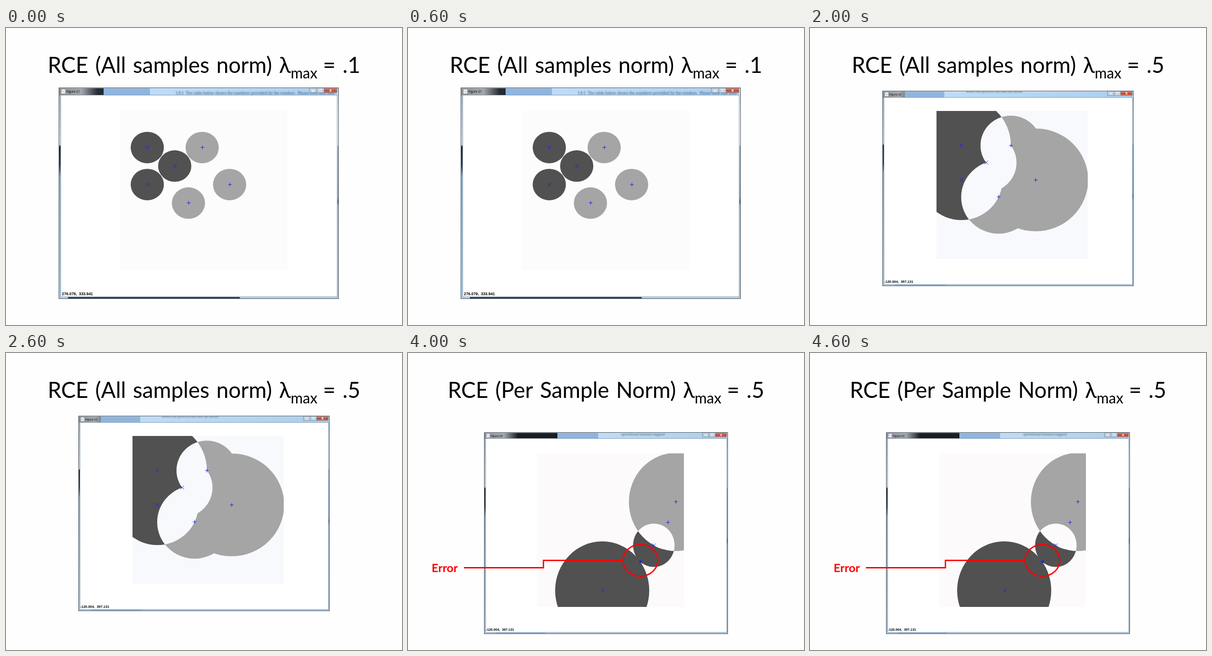
An HTML page with a canvas that plays this animation: 864 by 648 pixels, repeating every 5 s.

```html
<!DOCTYPE html>
<html lang="en">
<head>
<meta charset="utf-8">
<title>RCE classifier slides</title>
<style>
  html, body { margin: 0; width: 100%; height: 100%; overflow: hidden; background: #fefefe; }
  canvas { display: block; }
</style>
</head>
<body>
<canvas id="stage" width="864" height="648"></canvas>
<script>
const ctx = document.getElementById('stage').getContext('2d');

// Sample positions are fractions of the plot's width and height.
const grid = points => points.map(([x, y]) => [x * 0.0818 + 0.001, y * 0.1164]);
const shared = {
  dark: grid([[2, 2], [4, 3], [2, 4]]),
  light: grid([[6, 2], [8, 4], [5, 5]])
};

// win: x, y, w, h of the window; plot: the same for the axes;
// split: where the title bar turns from dark to mid blue to pale blue.
const slides = [
  { title: 'All samples norm', max: '.1', fig: 21, coords: '276.079,  333.941',
    win: [115, 130, 611, 461], plot: [248, 180, 366, 347], bg: '#fcfcfc',
    split: [213, 314], shade: '#252a30', samples: shared,
    ghost: ['1.8.1  The table below shows the numbers provided by the vendors.  Please note that they', 370, 144, '#3c5878'] },
  { title: 'All samples norm', max: '.15', fig: 24, coords: '-120.004,  397.131',
    win: [144, 151, 562, 429], plot: [264, 196, 340, 325], bg: '#fcfcfc',
    split: [310, 397], shade: '#1b1d20', samples: shared,
    ghost: ['(Before:  Assumptions and measured rates, i.e. failure rates)', 445, 163, '#a04860'] },
  { title: 'All samples norm', max: '.5', fig: 22, coords: '-120.004,  397.131',
    win: [158, 137, 548, 426], plot: [276, 181, 330, 323], bg: '#f7f9fd',
    split: [207, 293], shade: '#84888d', samples: shared,
    ghost: ['when the process has met all needs', 340, 140, '#40607c'] },
  { title: 'Normalized per class', max: '.5', fig: 28, coords: '-120.004,  397.131',
    win: [173, 151, 514, 412], plot: [284, 195, 309, 312], bg: '#fcfcfc',
    split: [320, 404], shade: '#202327',
    samples: {
      dark: [[0.408, 0.372], [0.8155, 0.558], [0.409, 0.745]],
      light: [[0.536, 0.2965], [0.7136, 0.596], [0.4466, 0.745]]
    } },
  { title: 'Per Sample Norm', max: '.5', fig: 29, coords: '-120.004,  397.131',
    win: [166, 173, 532, 440], plot: [281, 219, 321, 335], bg: '#fcfafb',
    split: [326, 415], shade: '#1b1d20', error: true,
    samples: {
      dark: [[0.7955, 0.5985], [0.7035, 0.7054], [0.4445, 0.893]],
      light: [[0.9453, 0.3164], [0.8925, 0.4478], [0.7035, 0.7054]]
    },
    ghost: ['operational mission support', 465, 179, '#40607c'] }
];

function rect(color, x, y, w, h) {
  ctx.fillStyle = color;
  ctx.fillRect(x, y, w, h);
}

function text(str, x, y, font, color = '#000') {
  ctx.font = font;
  ctx.fillStyle = color;
  ctx.fillText(str, x, y);
}

function gradient(x0, y0, x1, y1, stops) {
  const g = ctx.createLinearGradient(x0, y0, x1, y1);
  for (const [at, color] of stops) g.addColorStop(at, color);
  return g;
}

function line(points, color, width) {
  ctx.beginPath();
  for (const [x, y] of points) ctx.lineTo(x, y);
  ctx.strokeStyle = color;
  ctx.lineWidth = width;
  ctx.stroke();
}

function drawTitle({ title, max }) {
  const big = '47.5px Carlito, Lato, sans-serif', small = '32px Carlito, Lato, sans-serif';
  const parts = [[`RCE (${title}) λ`, big, 98], ['max', small, 110], [` = ${max}`, big, 98]];
  ctx.wordSpacing = '3px';
  const widths = parts.map(([str, font]) => {
    ctx.font = font;
    return ctx.measureText(str).width;
  });
  let x = 432 - widths.reduce((a, b) => a + b) / 2;
  parts.forEach(([str, font, y], i) => {
    text(str, x, y, font);
    x += widths[i];
  });
  ctx.wordSpacing = '0px';
}

function drawButtons(right, y, s) {
  const h = Math.round(10 * s), left = right - 60 * s;
  const mid = left + 16 * s, close = left + 32 * s;
  rect(gradient(0, y, 0, y + h, [[0, '#dde9f5'], [0.5, '#b4c8dc'], [1, '#c9dcee']]), left, y, 32 * s, h);
  rect(gradient(0, y, 0, y + h, [[0, '#e0a094'], [0.5, '#c54630'], [1, '#d4684c']]), close, y, 28 * s, h);
  ctx.strokeStyle = '#66788a';
  ctx.lineWidth = 0.8;
  ctx.strokeRect(left, y, 60 * s, h);
  line([[mid, y], [mid, y + h]], '#66788a', 0.8);
  line([[close, y], [close, y + h]], '#66788a', 0.8);
  rect('#fff', left + 5 * s, y + 5 * s, 6 * s, 2 * s);
  ctx.strokeStyle = '#fff';
  ctx.strokeRect(mid + 6 * s, y + 3 * s, 4 * s, 4 * s);
  text('x', close + 11.5 * s, y + 7.8 * s, `bold ${9 * s}px "Open Sans", sans-serif`, '#fff');
}

function drawWindow({ win: [x, y, w, h], split: [a, b], shade, fig, coords, ghost }) {
  const s = w / 611, side = Math.round(4.55 * s), bar = Math.round(16.5 * s);
  const right = x + w - Math.round(3.5 * s), bottom = y + h - Math.round(4.55 * s);

  rect('#b8d6f1', x, y, w, h);
  rect(gradient(0, y, 0, y + h, [[0, '#a9b4bd'], [0.1, '#b9c4cc'], [0.27, '#d8dde0'], [0.28, '#24282d'],
    [0.37, '#39434c'], [0.42, '#8fb0cf'], [1, '#b0cfec']]), x, y, side, h);
  rect(gradient(0, y, 0, y + h, [[0, '#bcd8f0'], [0.1, '#eef4f9'], [0.27, '#f4f7fa'], [0.28, '#9dc0e0'],
    [0.52, '#8fb2d4'], [0.54, '#58718b'], [0.56, '#a5c7e6'], [1, '#b0cfec']]), right, y, x + w - right, h);
  rect('#9bbfe2', x + w * 0.05, bottom, w * 0.2, y + h - bottom);
  if (fig === 21) rect('#3a434d', x + 20, bottom + 1, 375, 3);

  // Glass title bar over a darker backdrop on the left.
  const dark = a - x;
  rect(gradient(x, 0, a, 0, [[0, '#8c9094'], [Math.min(0.75, 50 * s / dark), '#a3a6aa'],
    [Math.min(0.97, 85 * s / dark), shade], [1, shade]]), x, y, dark, bar);
  rect('#8fb5de', a, y, b - a, bar);
  rect(gradient(b, 0, right, 0, [[0, '#bfdcf6'], [1, '#abceee']]), b, y, right - b, bar);
  if (ghost) {
    const [str, gx, gy, color] = ghost;
    ctx.save();
    ctx.beginPath();
    ctx.rect(x, y, w, bar);
    ctx.clip();
    ctx.filter = 'blur(0.9px)';
    text(str, gx, gy + 1, `${8.2 * s}px "Noto Serif", serif`, color);
    ctx.restore();
  }
  rect('rgba(255,255,255,0.4)', x + 1, y + 1, w - 2, 1);
  drawButtons(right, y + 1, s);

  rect('#f3f5f7', x + 6 * s, y + 4 * s, 8 * s, 9 * s);
  line([[x + 7 * s, y + 6 * s], [x + 10 * s, y + 10 * s], [x + 13 * s, y + 8 * s]], '#87919b', 1);
  text(`Figure ${fig}`, x + 17 * s, y + 11 * s, `${6.8 * s}px "Open Sans", sans-serif`);

  rect('#fff', x + side, y + bar, right - x - side, bottom - y - bar);
  ctx.lineWidth = 1;
  ctx.strokeStyle = '#7f97ad';
  ctx.strokeRect(x + side - 0.5, y + bar - 0.5, right - x - side + 1, bottom - y - bar + 1);
  ctx.strokeStyle = '#35424e';
  ctx.strokeRect(x + 0.5, y + 0.5, w - 1, h - 1);
  text(coords, x + side + (fig === 21 ? 2 : 0), bottom - 3.5 * s, `bold ${8.4 * s}px "Liberation Sans", Arial, sans-serif`);
}

// Each region reaches to the nearest sample of the other class, up to the limit.
function regions(own, other, limit, [px, py, pw, ph]) {
  const path = new Path2D();
  for (const [x, y] of own) {
    const r = Math.min(limit, ...other.map(([u, v]) => Math.hypot(x - u, y - v)));
    const cx = px + x * pw, cy = py + y * ph;
    path.moveTo(cx + r * pw, cy);
    path.ellipse(cx, cy, r * pw, r * ph, 0, 0, 2 * Math.PI);
  }
  return path;
}

function drawMarks(points, [px, py, pw, ph], cross) {
  for (const [u, v] of points) {
    const x = Math.round(px + u * pw) + 0.5, y = Math.floor(py + v * ph) + 0.5, d = 4;
    const strokes = cross
      ? [[[x - d, y - d], [x + d, y + d]], [[x - d, y + d], [x + d, y - d]]]
      : [[[x - d, y], [x + d, y]], [[x, y - d], [x, y + d]]];
    for (const stroke of strokes) line(stroke, '#1818f4', 1);
  }
}

function drawPlot({ plot, bg, max, samples: { dark, light } }) {
  const limit = max * 0.99;
  const darkArea = regions(dark, light, limit, plot);
  const lightArea = regions(light, dark, limit, plot);
  rect(bg, ...plot);
  ctx.save();
  ctx.beginPath();
  ctx.rect(...plot);
  ctx.clip();
  ctx.fillStyle = '#515151';
  ctx.fill(darkArea);
  ctx.fillStyle = '#a5a5a5';
  ctx.fill(lightArea);
  // Areas claimed by both classes stay empty.
  ctx.clip(darkArea);
  ctx.fillStyle = bg;
  ctx.fill(lightArea);
  ctx.restore();
  drawMarks(dark, plot, true);
  drawMarks(light, plot, false);
}

function drawError() {
  const red = '#ff0000';
  text('Error', 51.5, 478, 'bold 25.5px Carlito, Lato, sans-serif', red);
  line([[122, 468.5], [295.5, 468.5], [295.5, 452.5], [469, 452.5]], red, 3);
  ctx.beginPath();
  ctx.ellipse(507, 452.5, 38, 34.5, 0, 0, 2 * Math.PI);
  ctx.stroke();
}

function draw(slide) {
  rect('#fefefe', 0, 0, 864, 648);
  drawTitle(slide);
  drawWindow(slide);
  drawPlot(slide);
  if (slide.error) drawError();
}

function tick() {
  draw(slides[Math.floor(performance.now() / 1000) % slides.length]);
  requestAnimationFrame(tick);
}
tick();
</script>
</body>
</html>
```
